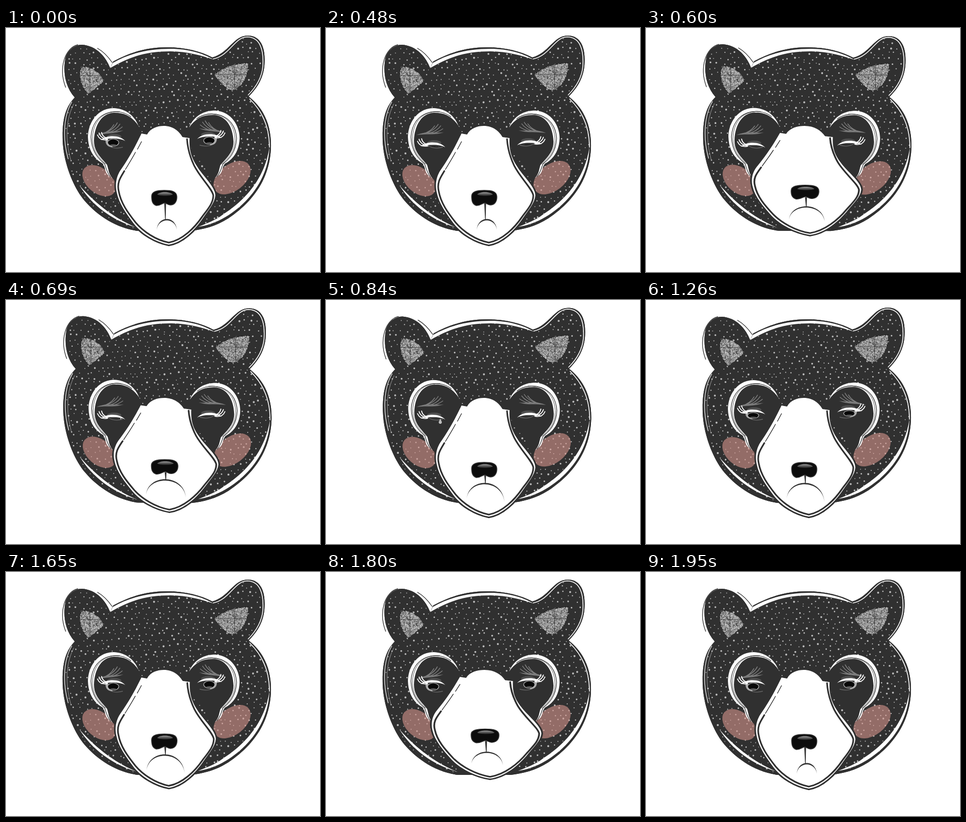
An HTML page for the animation above (2.16 s loop, 621 by 481 pixels).

```html
<!DOCTYPE html>
<html lang="en">
<head>
<meta charset="utf-8">
<title>Sad bear</title>
<style>
  html, body { margin: 0; height: 100%; overflow: hidden; background: #fff; }
  svg { display: block; width: 100vw; height: 100vh; }
  .line { fill: none; stroke: #303030; stroke-linecap: round; }
  .white { fill: none; stroke: #fff; stroke-linecap: round; }
</style>
</head>
<body>
<svg viewBox="0 0 621 481">
  <defs>
    <path id="fur" d="M206,79 L212,66 C250,45 285,38 318,38 C355,38 385,46 408,58 C440,50 450,15 478,15
      C505,15 514,40 511,75 C508,102 495,120 480,135 C512,160 525,195 524,235 C522,300 485,345 440,375
      C415,391 390,397 365,400 L262,400 C225,396 185,375 155,340 C130,310 113,260 112,220
      C111,180 118,155 136,137 C116,115 113,85 117,62 C120,45 135,33 150,33 C180,35 198,58 206,79Z"/>
    <path id="earL" d="M147,84 Q148,77 153,76 C175,77 190,92 193,106 L163,131 C150,116 143,99 147,84Z"/>
    <path id="earR" d="M411,93 C430,76 452,70 479,69 C480,92 470,116 447,124 C430,118 424,106 411,93Z"/>
    <clipPath id="inFur"><use href="#fur"/></clipPath>
    <clipPath id="inEars"><use href="#earL"/><use href="#earR"/></clipPath>
    <linearGradient id="shine" x2="0" y2="1">
      <stop stop-color="#999"/><stop offset="1" stop-color="#222"/>
    </linearGradient>
    <g id="socket">
      <path fill="#303030" d="M262,193 C250,175 235,166 212,167 C190,169 175,190 174,222 C174,245 188,255 200,270
        C203,280 204,290 213,299 L226,281 L270,208Z"/>
      <path fill="#fff" d="M262,193 C252,168 232,158 210,158 C178,160 162,190 162,215 C163,245 178,260 191,267
        C197,274 195,284 202,290 L211,297 C203,289 203,280 200,270 C188,255 174,245 174,222
        C175,190 190,169 212,167 C235,166 250,175 262,193Z"/>
      <path class="line" stroke-width="1.2" d="M247,175 C222,155 171,163 168,215 C169,243 182,257 195,268 C199,278 199,284 207,294"/>
      <path class="line" stroke-width=".8" d="M225,165 C192,162 171,185 171,220 C172,244 184,255 197,268"/>
    </g>
    <g id="eye">
      <g class="brow">
        <path fill="#777" d="M179,211 C200,202 218,208 233,206 C215,212 200,208 179,211Z"/>
        <path fill="none" stroke="#808080" stroke-width="1.4" stroke-linecap="round"
          d="M195,208 Q215,202 222,190 M202,208 Q219,204 227,193 M210,208 Q223,205 231,199 M190,209 Q207,205 215,193"/>
      </g>
      <path fill="none" stroke="#666" stroke-width="1.3" d="M201,231 Q213,240 231,235"/>
      <g class="iris">
        <path fill="#aaa" d="M197,220 C196,230 202,235 211,235 L204,222Z"/>
        <ellipse cx="212" cy="226" rx="11" ry="7" fill="#080808" stroke="#b5b5b5" stroke-width="1.2"/>
        <ellipse cx="212" cy="230.500" rx="6" ry="1.500" fill="#555"/>
      </g>
      <g class="lid">
        <ellipse cx="214" cy="214" rx="14" ry="5" fill="#505050"/>
        <path fill="#fff" d="M187,221 C200,210 226,211 236,223 C224,216 203,217 187,221Z"/>
        <path class="white" stroke-width="1.8" d="M201,220 Q186,223 181,211 M199,219 Q187,217 184,207 M201,218 Q191,215 189,206"/>
      </g>
    </g>
  </defs>

  <g id="head">
    <use href="#fur" fill="#303030"/>
    <path class="line" stroke-width="1.3" d="M142,33 C117,39 103,78 118,117 M181,40 C195,48 203,58 210,68"/>
    <path id="dots" fill="#bcbcbc" clip-path="url(#inFur)"/>
    <use href="#fur" class="line" stroke-width="8" clip-path="url(#inFur)"/>
    <g fill="#fff">
      <path d="M206,79 L211,69 C245,49 285,41 325,41 C360,41 390,50 410,62 C388,55 360,46 325,46 C285,46 250,53 206,79Z"/>
      <path d="M521,235 C519,297 480,345 435,372 C415,384 395,390 380,392 C395,386 415,379 430,367 C475,338 512,295 521,235Z"/>
      <path d="M145,310 C172,352 212,380 260,394 C222,379 182,352 145,310Z"/>
    </g>
    <path class="white" stroke-width="1.6" d="M410,61 C443,54 452,18 477,17.500 C502,18 510,42 508,75 C506,98 494,117 479,132
      M482,140 C508,165 521,195 521,235"/>
    <path class="white" stroke-width="1.2" d="M130,146 C113,175 112,220 123,258"/>
    <path class="white" stroke-width=".5" d="M134,150 C118,180 117,220 128,260"/>
    <g fill="#8c8c8c" stroke="#202020" stroke-width="1.4" stroke-dasharray="9 2">
      <use href="#earL"/><use href="#earR"/>
    </g>
    <g clip-path="url(#inEars)">
      <path id="darkSpecks" fill="#4c4c4c"/>
      <path id="lightSpecks" fill="#c8c8c8"/>
      <path stroke="#333" stroke-width=".8" d="M148,94H192 M166,75V128 M416,92H478 M452,70V124"/>
    </g>
    <g fill="#d6948d" fill-opacity=".6">
      <ellipse cx="184" cy="301" rx="38" ry="24.500" transform="rotate(40 184 301)"/>
      <ellipse cx="447" cy="295" rx="42" ry="26" transform="rotate(-38 447 295)"/>
    </g>
    <use href="#socket"/>
    <use href="#socket" transform="matrix(-1 0 0 .96 624 11)"/>
  </g>

  <use href="#eye"/>
  <use href="#eye" transform="matrix(-1 0 0 1 614 -4)"/>
  <path id="tear" fill="#bbb" stroke="#eee" stroke-width=".8" d="M0,-6 C1,-2 3.500,0 3.500,2.500 A3.500,3.500 0 0 1 -3.500,2.500 C-3.500,0 -1,-2 0,-6Z"/>

  <g id="muzzle">
    <path fill="#fff" stroke="#303030" stroke-width="6" paint-order="stroke" d="M268,208 L279,210 C286,197 300,193 312,193
      C330,193 342,203 349,215 L363,217 C362,240 366,255 378,273 C388,290 414,313 414,330
      C413,345 400,359 390,374 C374,398 349,423 322,427 C295,422 268,405 253,386
      C238,366 223,345 219,324 C215,307 219,292 226,281 C244,255 255,235 268,208Z"/>
    <path class="line" stroke-width="3.2" d="M234,282 C226,295 219,305 223,322 C227,345 241,364 256,383
      C271,401 296,418 322,423 C349,418 373,394 388,372 C400,356 410,345 410,330
      C408,317 384,295 372,271 C362,250 359,235 358,219"/>
    <path class="line" stroke-width="1.4" d="M268,224 L260,239 M256,245 C249,258 242,269 236,279"/>
    <g transform="translate(0 1)">
      <path fill="#0c0c0c" stroke="#333" stroke-width="1.5" d="M288,331 C288,321 299,319 313,319 C328,319 338,321 338,332
        C338,343 332,348 325,348 C320,348 317,344 314,344 C309,344 305,350 297,349 C289,346 288,339 288,331Z"/>
      <path fill="url(#shine)" d="M299,327 C304,321 324,321 330,327 C325,331 304,331 299,327Z"/>
    </g>
    <path id="mouth" fill="#303030"/>
  </g>
</svg>
<script>
const LOOP = 2160, STEP = 30;
const $ = id => document.getElementById(id);
const set = (id, name, value) => $(id).setAttribute(name, value);
const pose = (part, transform) => document.querySelector(part).setAttribute('transform', transform);
const mix = (a, b, k) => a + (b - a) * k;
const span = (t, a, b) => Math.min(1, Math.max(0, (t - a) / (b - a)));
const ease = (t, a, b) => { const k = span(t, a, b); return k * k * (3 - 2 * k); };
const bump = (t, a, b) => Math.sin(Math.PI * span(t, a, b)) ** 2;

let seed = 11;
const random = () => (seed = seed * 16807 % 2147483647) / 2147483647;

function scatterDots() {
  let d = '';
  for (let row = 0, y = 18; y < 400; y += 10.5, row++) {
    for (let x = 110 + row % 2 * 6; x < 526; x += 12) {
      const r = 0.9 + 1.1 * random() ** 2;
      const cx = x + random() * 7 - 3.5, cy = y + random() * 7 - 3.5;
      d += `M${cx - r},${cy}a${r},${r} 0 1 0 ${2 * r},0a${r},${r} 0 1 0 ${-2 * r},0`;
    }
  }
  set('dots', 'd', d);
}

function scatterSpecks(id) {
  let d = '';
  for (const [x, y, w, h] of [[146, 73, 49, 58], [410, 68, 71, 57]]) {
    for (let i = 0; i < w * h / 6; i++) {
      d += `M${x + w * random()},${y + h * random()}h1.5v1.3h-1.500z`;
    }
  }
  set(id, 'd', d);
}

function mouthPath(wide) {
  const cx = mix(318, 315.5, wide), half = mix(20, 37.5, wide);
  const top = mix(376.5, 360.5, wide), left = mix(398, 392, wide), right = 398;
  const base = (left + right) / 2;
  const arch = y => base - (base - y) / 0.75;
  const a = cx - half, b = cx + half, pull = half * 0.12;
  const outer = arch(top), inner = arch(top + 2.8);
  return `M${a},${left}C${a + pull},${outer} ${b - pull},${outer} ${b},${right}` +
    `C${b - pull - 1},${inner} ${a + pull + 1},${inner} ${a},${left}Z` +
    `M313,346L316.500,346L315.800,${top + 1}L314.600,${top + 1}Z`;
}

function draw(t) {
  const open = 1 - ease(t, 300, 510) + ease(t, 1110, 1320);
  const squash = bump(t, 480, 760) + bump(t, 1620, 1950);
  const wide = ease(t, 480, 670) - ease(t, 1640, 1950);
  const tilt = 0.42 * (ease(t, 480, 660) - ease(t, 660, 980));

  pose('#head', `rotate(${tilt} 317 400)`);
  pose('#muzzle', `translate(298 194) scale(${1 + 0.105 * squash} ${1 - 0.086 * squash}) translate(-298 -194)`);
  pose('.brow', `rotate(${-5 * open} 185 210)`);
  pose('.lid', `translate(0 ${13 * (1 - open)})`);
  pose('.iris', `translate(0 ${234 * (1 - open)}) scale(1 ${open})`);
  set('mouth', 'd', mouthPath(wide));

  const fall = span(t, 990, 1260);
  const y = 232 + 13 * span(t, 660, 990) + 50 * fall * fall;
  pose('#tear', `translate(${227 - 2 * span(t, 690, 990)} ${y}) scale(${0.95 * span(t, 600, 900)})`);
  set('tear', 'opacity', t < 660 ? 0 : 1 - span(t, 1140, 1260));
}

function tick() {
  draw(Math.floor(performance.now() % LOOP / STEP) * STEP);
  requestAnimationFrame(tick);
}

scatterDots();
scatterSpecks('darkSpecks');
scatterSpecks('lightSpecks');
tick();
</script>
</body>
</html>
```
